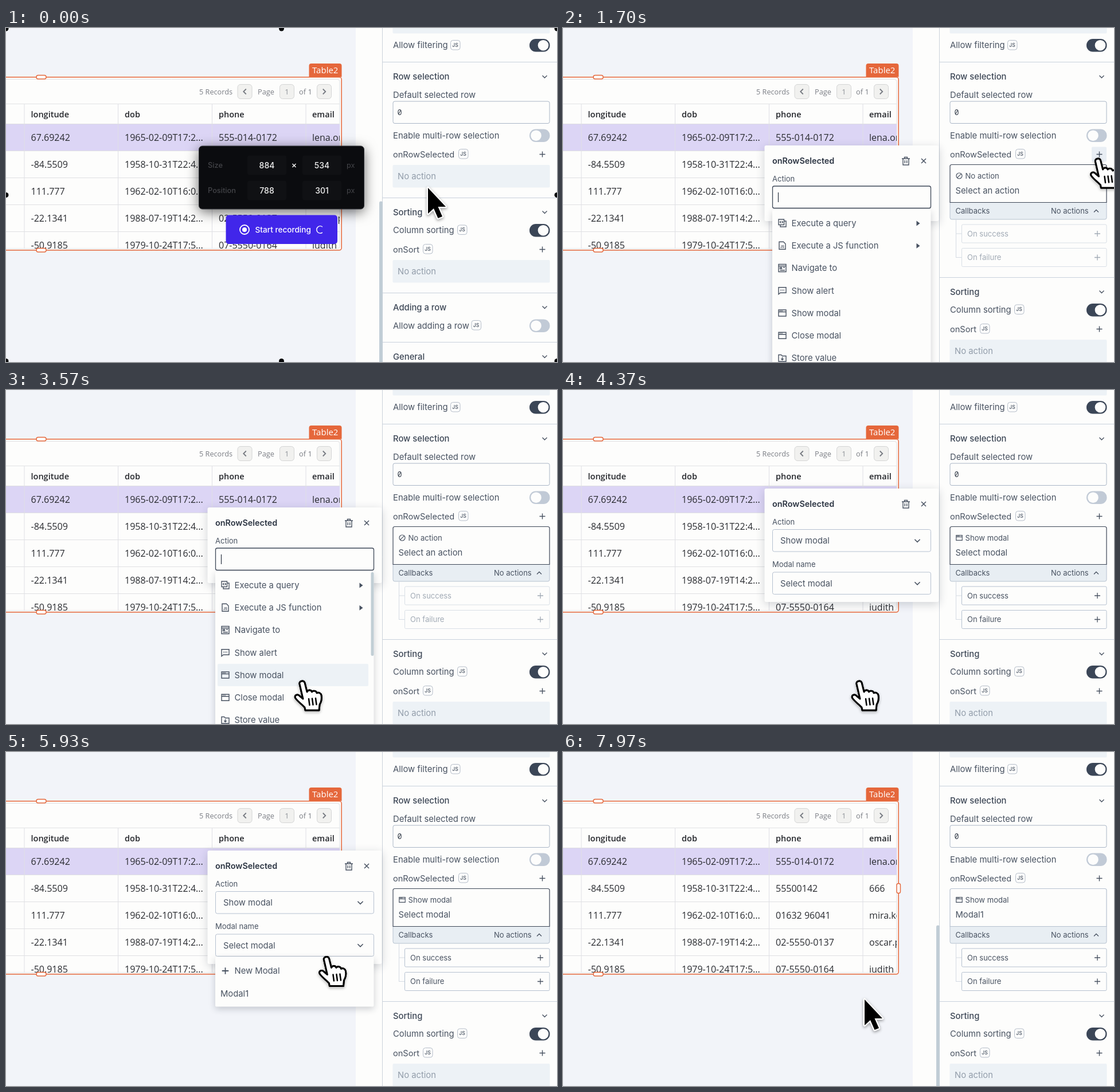
Write an HTML page with a canvas that moves like this. It is 961 by 583 pixels and loops after 8 s.

```html
<!DOCTYPE html>
<html lang="en">
<head>
<meta charset="utf-8">
<title>Row selection action</title>
<style>
html, body { margin: 0; width: 100%; height: 100%; overflow: hidden; background: #fdfdfc; }
canvas { display: block; width: 961px; height: 583px; }
</style>
</head>
<body>
<canvas id="stage"></canvas>
<script>
const W = 961, H = 583, LOOP = 8000;
const canvas = document.getElementById('stage');
const ctx = canvas.getContext('2d');
const dpr = window.devicePixelRatio || 1;
canvas.width = W * dpr;
canvas.height = H * dpr;

const UI = 'Inter, sans-serif', TABLE = '"Open Sans", sans-serif', MONO = '"Noto Sans Mono", monospace';
const WHITE = '#fdfdfc', INK = '#485261', DARK = '#2b3442', MUTED = '#929daa';
const LINE = '#c9d1dc', EDGE = '#b6c1d0', PALE = '#edf2f6', ORANGE = '#e5673b';

// Moments at which the interface changes
const AT = { overlay: 30, open: 1230, choose: 4250, dropdown: 5500, pick: 6890, close: 7650 };
const CLICKS = [1080, 4130, 5400, 6770];

const clamp = v => Math.max(0, Math.min(1, v));
const ease = v => v * v * (3 - 2 * v);
const ramp = (t, from, to) => clamp((t - from) / (to - from));
const during = (t, from, to, f = 120) => Math.min(ramp(t, from, from + f), 1 - ramp(t, to, to + f));

function text(s, x, y, size = 14.8, color = INK, weight = 400, font = UI, align = 'left') {
  ctx.font = `${weight} ${size}px ${font}`;
  ctx.fillStyle = color;
  ctx.textAlign = align;
  ctx.fillText(s, x, y + size * 0.36);
}

function box(x, y, w, h, r, fill, stroke, width = 1) {
  ctx.beginPath();
  ctx.roundRect(x, y, w, h, r);
  if (fill) { ctx.fillStyle = fill; ctx.fill(); }
  if (stroke) { ctx.strokeStyle = stroke; ctx.lineWidth = width; ctx.stroke(); }
}

function shadowBox(x, y, w, h, r, fill, color, blur, dy) {
  ctx.save();
  ctx.shadowColor = color;
  ctx.shadowBlur = blur * dpr;
  ctx.shadowOffsetY = dy * dpr;
  box(x, y, w, h, r, fill);
  ctx.restore();
}

function line(x1, y1, x2, y2, color = LINE, width = 1) {
  ctx.beginPath();
  ctx.moveTo(x1, y1);
  ctx.lineTo(x2, y2);
  ctx.strokeStyle = color;
  ctx.lineWidth = width;
  ctx.stroke();
}

function dot(x, y, r, fill) {
  ctx.beginPath();
  ctx.arc(x, y, r, 0, 7);
  ctx.fillStyle = fill;
  ctx.fill();
}

function faded(alpha, draw) {
  if (alpha <= 0) return;
  ctx.save();
  ctx.globalAlpha = alpha;
  draw();
  ctx.restore();
}

const ICONS = {
  down: 'M-4-2L0 2L4-2', up: 'M-4 2L0-2L4 2', prev: 'M2.5-5L-2.5 0L2.5 5', next: 'M-2.5-5L2.5 0L-2.5 5',
  plus: 'M-5 0H5M0-5V5', cross: 'M-4-4L4 4M4-4L-4 4',
  none: 'M5 0A5 5 0 1 1-5 0A5 5 0 1 1 5 0M-3.2 3.2L3.2-3.2',
  trash: 'M-7-4H7M-5-4V7H5V-4M-2.5-4V-6.5H2.5V-4M-1.7-1V4M1.7-1V4',
  query: 'M-6.5-6.5H3V3H-6.5ZM-3.5 3V6.5H6.5V-3.5H3M-2.5-3.5L-4-1.8L-2.5 0M-.8-3.5L.8-1.8L-.8 0',
  script: 'M-5.5-6.5H2L5.5-3V6.5H-5.5Z',
  page: 'M-6.5-6.5H6.5V6.5H-6.5ZM-6.5-3.5H6.5M-4-1H-1V1H-4ZM1.5-1H4.5M-4 3.7H4.5',
  alert: 'M-6.5-5.5H6.5V4H-3.5L-6.5 6.5ZM-3.5-.8H-2M-.8-.8H.8M2-.8H3.5',
  modal: 'M-6.5-5.5H6.5V5.5H-6.5ZM-6.5-2H6.5M-4.5-3.8H-3M-1.5-3.8H0',
  store: 'M-6.5-5.5H-2L0-3.5H6.5V6H-6.5ZM0-1.5V3.5M-2.2 1.3L0 3.5L2.2 1.3'
};
for (const k in ICONS) ICONS[k] = new Path2D(ICONS[k]);

function icon(name, x, y, color = INK, width = 1.4, scale = 1) {
  ctx.save();
  ctx.translate(x, y);
  ctx.scale(scale, scale);
  ctx.strokeStyle = color;
  ctx.lineWidth = width / scale;
  ctx.stroke(ICONS[name]);
  ctx.restore();
  if (name === 'script') text('JS', x, y + 2.5, 5.5, color, 700, UI, 'center');
}

// Table

const COLUMNS = [[43.5, 'longitude'], [207, 'dob'], [371, 'phone'], [534, 'email']];
const ROWS = [
  ['67.69242', '1965-02-09T17:2...', '555-014-0172', 'lena.or'],
  ['-84.5509', '1958-10-31T22:4...', '55500142', '666'],
  ['111.777', '1962-02-10T16:0...', '01632 96041', 'mira.ko'],
  ['-22.1341', '1988-07-19T14:2...', '02-5550-0137', 'oscar.pe'],
  ['-50.9185', '1979-10-24T17:5...', '07-5550-0164', 'judith']
];

function pageButton(x, content) {
  box(x - 12.5, 98.5, 25, 25, 5, '#f1f1ef', '#d4d5d5');
  if (content === '1') text('1', x, 111, 12.8, '#8d9096', 400, TABLE, 'center');
  else icon(content, x, 111, '#777b82', 1.8, 0.9);
}

function drawTable(t) {
  const hover = during(t, 4780, 5450);
  box(-20, 85.8, 605.2, 302, 4, WHITE, ORANGE, 1.5);
  box(-20, 89.5, 602, 295.5, 4, WHITE, '#dfe0e3');

  ctx.save();
  ctx.beginPath();
  ctx.rect(0, 90, 582, 295);
  ctx.clip();
  text('5 Records', 337, 111, 12.7, '#7b7e85', 400, TABLE);
  pageButton(416.5, 'prev');
  text('Page', 439, 111, 12.8, '#7b7e85', 400, TABLE);
  pageButton(490, '1');
  text('of 1', 511, 111, 12.8, '#7b7e85', 400, TABLE);
  pageButton(555, 'next');

  ctx.fillStyle = '#dcd5f5';
  ctx.fillRect(0, 168, 582, 46);
  faded(hover, () => {
    ctx.fillStyle = '#e9e9e8';
    ctx.fillRect(0, 356, 582, 30);
  });
  line(0, 132.5, 582, 132.5, '#e2e3e5');
  for (let i = 0; i < 5; i++) line(0, 167.5 + i * 47, 582, 167.5 + i * 47, '#dfe0e2');
  for (const x of [32, 195.5, 359.5, 523]) line(x, 133, x, 386, '#dfdfe5');
  COLUMNS.forEach(([x, name], c) => {
    text(name, x, 150.5, 14.5, '#24262b', 600, TABLE);
    ROWS.forEach((row, r) => text(row[c], x, 191 + r * 47, 16, '#292b30', 400, TABLE));
  });
  faded(hover, () => {
    box(-10, 376, 57, 8, 4, '#8c8d8e');
    box(573, 168, 6, 60, 3, '#8c8d8e');
  });
  ctx.restore();

  box(528.5, 62, 57, 23.5, [4, 4, 0, 0], ORANGE);
  text('Table2', 534, 74, 15, '#fff', 400, TABLE);
  box(53, 82.5, 17, 6.5, 3, WHITE, ORANGE, 1.4);
  box(53, 384.5, 17, 6.5, 3, WHITE, ORANGE, 1.4);
  box(582, 229.5, 6.5, 17, 3, WHITE, ORANGE, 1.4);
}

// Property panel

function badge(x, y) {
  box(x - 8, y - 8, 16.5, 16.5, 4, WHITE, '#b5bdc9');
  text('JS', x, y + 0.3, 8.5, '#5b6573', 600, UI, 'center');
}

function toggle(y, on) {
  box(913, y - 11, 35.5, 22.5, 11, on ? '#3b4657' : '#c1cad6');
  dot(on ? 937 : 924.5, y + 0.2, 9.3, WHITE);
}

function section(name, y) {
  text(name, 675, y, 14.8, '#3d4756', 500);
  icon('down', 939.5, y, INK, 1.4);
}

const divider = y => line(657, y + 0.5, W, y + 0.5);

function noAction(y) {
  box(674.5, y - 19.5, 274, 39.5, 2, PALE);
  text('No action', 683, y, 14.8, MUTED);
}

function drawCard(t) {
  const chosen = t >= AT.choose;
  const border = t < AT.close ? '#3d4757' : EDGE;
  const tint = chosen ? INK : '#a1aab5';
  box(675, 304.5, 273, 29.5, [0, 0, 3, 3], '#e8eef3', EDGE);
  box(675, 238.5, 273, 66, [3, 3, 0, 0], WHITE, border, 1.2);
  icon(chosen ? 'modal' : 'none', 691, 258, INK, 1.2, chosen ? 0.8 : 1);
  text(chosen ? 'Show modal' : 'No action', 701.5, 258, 13.1);
  text(t >= AT.pick ? 'Modal1' : chosen ? 'Select modal' : 'Select an action', 684.5, 284);
  text('Callbacks', 684.5, 319, 13);
  text('No actions', 851, 319, 13);
  icon('up', 930, 319.5, INK, 1.3);
  line(685.5, 334, 685.5, 400.5, '#d5dbe3');
  [['On success', 359], ['On failure', 400.5]].forEach(([name, y]) => {
    line(685, y, 695, y, '#d5dbe3');
    box(695.5, y - 16, 252.5, 32, 2, WHITE, chosen ? EDGE : '#d9dfe6');
    text(name, 705, y, 13, tint);
    icon('plus', 932, y, tint, 1.3);
  });
}

function drawPanel(t) {
  const open = t >= AT.open, dy = open ? 139 : 0;
  ctx.fillStyle = WHITE;
  ctx.fillRect(610, 0, W - 610, H);
  line(656.5, 0, 656.5, H, '#cbd2da');
  box(674.5, -30, 274, 39.5, 2, PALE);
  text('Allow filtering', 675, 30);
  badge(783.5, 29.5);
  toggle(30, true);
  divider(59);

  section('Row selection', 85);
  text('Default selected row', 675, 116.5);
  box(675, 128, 273, 38.5, 3, WHITE, '#aab6c6');
  text('0', 682.5, 147, 13.5, '#39424f', 400, MONO);
  text('Enable multi-row selection', 675, 187.5);
  toggle(187.5, false);
  text('onRowSelected', 675, 220.5, 14.6);
  badge(797.5, 219.5);
  faded(during(t, 960, 2620, 80), () => box(922, 207.5, 26, 26, 2, '#e9eef4'));
  icon('plus', 935.5, 220.5);
  if (open) drawCard(t);
  else noAction(258.5);

  divider(296 + dy);
  section('Sorting', 321.5 + dy);
  text('Column sorting', 675, 353 + dy);
  badge(795.5, 352 + dy);
  toggle(353 + dy, true);
  text('onSort', 675, 386.5 + dy, 14.6);
  badge(735.5, 385.5 + dy);
  icon('plus', 935.5, 386.5 + dy);
  noAction(424.5 + dy);
  divider(462 + dy);
  section('Adding a row', 487.5 + dy);
  text('Allow adding a row', 675, 519.5 + dy);
  badge(820, 518.5 + dy);
  toggle(519.5 + dy, false);
  divider(548 + dy);
  section('General', 573.5 + dy);

  const bar = Math.max(1 - ramp(t, 500, 700), during(t, 4400, 5500), ramp(t, 7500, 7600));
  faded(bar, () => box(651, 302.5, 6, 290, 3, '#c1cdd6'));
}

// Popup

const ACTIONS = [
  ['query', 'Execute a query'], ['script', 'Execute a JS function'], ['page', 'Navigate to'],
  ['alert', 'Show alert'], ['modal', 'Show modal'], ['modal', 'Close modal'], ['store', 'Store value']
];

function popupFrame(y, h) {
  shadowBox(351.5, y, 304, h, 3, WHITE, 'rgba(30,40,60,.2)', 16, 4);
  text('onRowSelected', 365, y + 27, 14.4, DARK, 600);
  icon('trash', 598, y + 27, INK, 1.4);
  icon('cross', 629, y + 27, INK, 1.5);
  text('Action', 365, y + 58, 13);
}

function listBox(y, h) {
  shadowBox(365, y, 276.5, h, 2, WHITE, 'rgba(30,40,60,.22)', 12, 4);
}

function selectBox(y, value) {
  box(365.5, y, 276, 38.5, 3, WHITE, EDGE);
  text(value, 379, y + 19.5);
  icon('down', 618, y + 19.5, INK, 1.6, 1.15);
}

const inList = p => p.x > 365 && p.x < 641 && p.y > 320;

function drawActionPopup(t, p) {
  popupFrame(205, 132);
  box(365.5, 276, 276, 38.5, 3, WHITE, '#3d4757', 1.3);
  line(375.5, 287, 375.5, 304, DARK, 1.2);
  faded(ramp(t, AT.open + 80, AT.open + 180), () => {
    listBox(317, 290);
    ACTIONS.forEach(([name, label], i) => {
      const y = 340.5 + i * 39.25;
      if (inList(p) && Math.abs(p.y - y) < 19.6) box(369, y - 19.5, 263, 39, 2, PALE);
      icon(name, 382.5, y, INK, 1.4);
      text(label, 398.5, y);
      if (i < 2) {
        ctx.beginPath();
        ctx.moveTo(616.5, y - 4);
        ctx.lineTo(622.5, y + 0.5);
        ctx.lineTo(616.5, y + 5);
        ctx.fillStyle = INK;
        ctx.fill();
      }
    });
    if (inList(p)) box(636.5, 318, 5, 146, 2.5, '#c1ced5');
  });
}

function drawModalPopup(t, p) {
  popupFrame(172, 198);
  selectBox(243.5, 'Show modal');
  text('Modal name', 365, 304.5, 13);
  selectBox(318, t >= AT.pick ? 'Modal1' : 'Select modal');
  faded(during(t, AT.dropdown, AT.pick - 60, 80), () => {
    listBox(357.5, 87);
    const row = p.y > 401 ? 421 : p.y > 361 ? 382 : 0;
    if (row) box(369, row - 19.5, 269, 39, 2, PALE);
    icon('plus', 382.5, 382, INK, 1.8, 1.15);
    text('New Modal', 398.5, 382);
    text('Modal1', 374, 421.5);
  });
}

// Screen recorder overlay

function drawRecorder() {
  for (const x of [0, 480.5, 961]) for (const y of [1, 291.5, 581.5])
    if (x !== 480.5 || y !== 291.5) dot(x, y, 4.5, '#08090b');
  shadowBox(336.5, 206, 288, 110, 6, '#0b0c0f', 'rgba(0,0,0,.6)', 22, 5);
  box(336.5, 206, 288, 110, 6, null, '#33353a');
  [['Size', '884', '534', 239.5], ['Position', '788', '301', 283.5]].forEach(([label, a, b, y]) => {
    text(label, 352, y, 12.8, '#434448', 500);
    for (const [x, value] of [[455, a], [551, b]]) {
      box(x - 34, y - 17, 68, 34, 4, '#101114');
      text(value, x, y, 14, '#f2f2f2', 500, UI, 'center');
    }
    text('px', 594, y, 12.6, '#434448');
  });
  icon('cross', 502.5, 240, '#f2f2f2', 1.5, 0.75);
  box(383.5, 326.5, 194.5, 50.5, 5, '#4126ea');
  dot(416, 352, 4, '#fff');
  ctx.strokeStyle = '#fff';
  ctx.lineWidth = 1.8;
  ctx.beginPath();
  ctx.arc(416, 352, 8, 0, 7);
  ctx.stroke();
  text('Start recording', 434.5, 352, 13.6, '#fff', 500);
  ctx.lineWidth = 1.4;
  ctx.beginPath();
  ctx.arc(548, 352, 6.2, 0.9, 5.4);
  ctx.stroke();
}

// Pointer

const MOVES = [
  // start, end, x, y
  [250, 980, 931, 217], [1070, 1300, 932.5, 229], [2650, 3420, 516, 509],
  [4700, 5300, 561, 346], [5750, 6400, 547.5, 412], [7100, 7550, 525, 431]
];

function pointer(t) {
  let x = 735, y = 278;
  for (const [from, to, nx, ny] of MOVES) {
    const k = ease(ramp(t, from, to));
    x += (nx - x) * k;
    y += (ny - y) * k;
  }
  return { x, y };
}

// The pointer shrinks briefly at each click
function press(t) {
  const near = Math.min(...CLICKS.map(c => Math.abs(t - c)));
  return 1 - 0.2 * ease(1 - ramp(near, 30, 170));
}

const ARROW = new Path2D('M1 1V46L11 37L18.5 54L26 51L18.5 34H32Z');
const HAND = new Path2D('M-4 4C-5-1 3-3 5 2L9 18C11 14 16 14 17.5 18C20 15 25 16 26 20' +
  'C29 18 33 20 34 24C35 30 34 35 31 40L30 50H6L5 45C1 40-6 36-11 29C-14 24-8 21-4 25L2 30Z');

function drawPointer(p, hand, scale) {
  ctx.save();
  ctx.translate(p.x, p.y);
  ctx.scale(scale, scale);
  ctx.lineJoin = ctx.lineCap = 'round';
  ctx.save();
  ctx.shadowColor = 'rgba(0,0,0,.4)';
  ctx.shadowBlur = 5 * dpr;
  ctx.shadowOffsetY = 2 * dpr;
  ctx.strokeStyle = hand ? '#000' : '#fff';
  ctx.lineWidth = hand ? 3 : 4.5;
  ctx.stroke(hand ? HAND : ARROW);
  ctx.restore();
  ctx.fillStyle = hand ? '#fff' : '#000';
  ctx.fill(hand ? HAND : ARROW);
  if (hand) {
    ctx.strokeStyle = '#000';
    ctx.lineWidth = 3;
    ctx.stroke(HAND);
    for (let i = 0; i < 3; i++) line(12 + i * 6, 30 - i * 0.5, 13.5 + i * 6, 41 - i * 0.5, '#000', 2.5);
  }
  ctx.restore();
}

function drawCursor(t) {
  const hand = t >= 1150 && t < AT.pick + 60;
  const a = pointer(t), b = pointer(Math.max(0, t - 16));
  const samples = Math.hypot(a.x - b.x, a.y - b.y) > 2 ? 5 : 1;
  for (let i = 0; i < samples; i++) {
    const k = i / 5;
    const p = { x: a.x + (b.x - a.x) * k, y: a.y + (b.y - a.y) * k };
    faded(1 / (i + 1), () => drawPointer(p, hand, press(t)));
  }
}

function draw(t) {
  const p = pointer(t);
  ctx.setTransform(dpr, 0, 0, dpr, 0, 0);
  ctx.fillStyle = '#f2f4f9';
  ctx.fillRect(0, 0, W, H);
  drawTable(t);
  drawPanel(t);
  if (t < AT.choose) faded(ramp(t, AT.open, AT.open + 100), () => drawActionPopup(t, p));
  else faded(1 - ramp(t, AT.close, AT.close + 100), () => drawModalPopup(t, p));
  faded(1 - ramp(t, AT.overlay, AT.overlay + 60), drawRecorder);
  drawCursor(t);
}

const start = performance.now();
function tick() {
  draw((performance.now() - start) % LOOP);
  requestAnimationFrame(tick);
}
tick();
</script>
</body>
</html>
```
